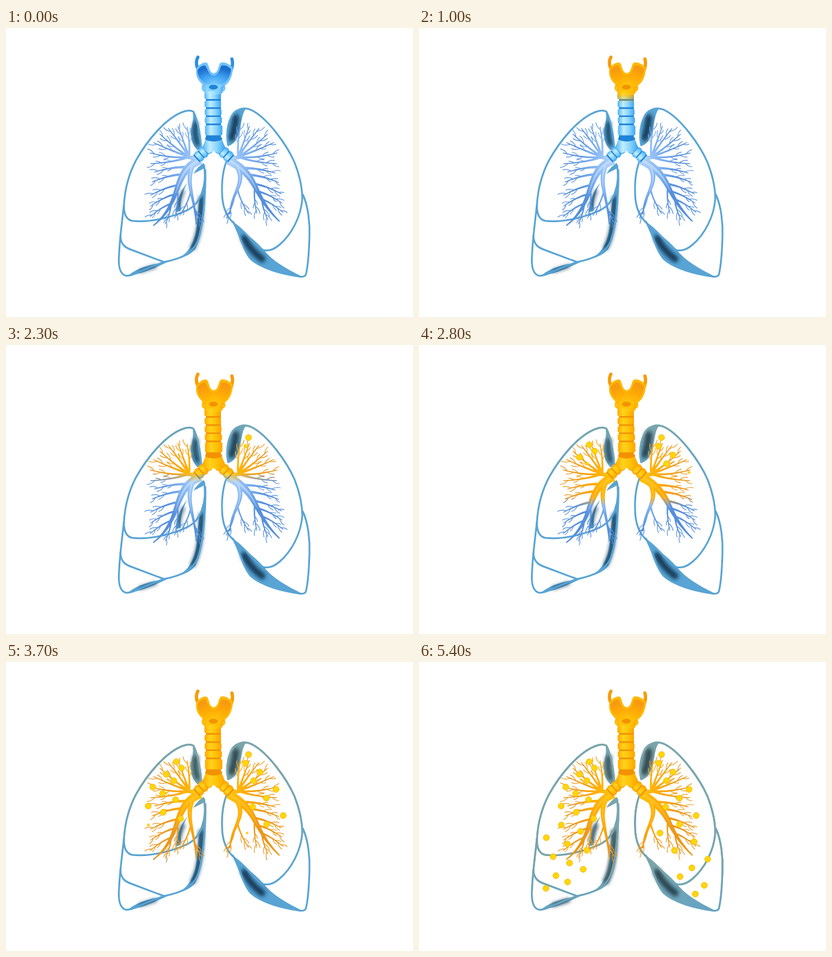
An HTML page for the animation above (5500 ms loop, 680 px wide and 484 px high).

```html
<!DOCTYPE html>
<html lang="en">
<head>
<meta charset="utf-8">
<title>Airflow through the lungs</title>
<style>
  @property --edge { syntax: '<number>'; inherits: true; initial-value: 38; }
  @keyframes flow { from { --edge: 38; } to { --edge: 478; } }
  html, body { margin: 0; width: 100%; height: 100%; overflow: hidden; background: #fff; }
  svg { display: block; width: 680px; height: 484px; animation: flow 5.5s steps(55) infinite; }
  .wipe { transform: translateY(calc(var(--edge) * 1px)); }
  .dot { fill: #ffd60a; stroke: #f7b500; stroke-width: 1;
         transform-box: fill-box; transform-origin: center;
         transform: scale(clamp(0, (var(--edge) - var(--from)) / 20, 1)); }
</style>
</head>
<body>
<svg id="stage" viewBox="0 0 680 484" xmlns="http://www.w3.org/2000/svg"></svg>
<script>
const MID = 347;
const SIDES = [-1, 1];

const BLUE = {
  id: 'blue', tube: ['#4db5f7', '#c2edff', '#86d3ff', '#3ba5f0'], gap: '#1f84d8', rim: '#70c2fb',
  body: ['#7bcbff', '#42a5f2', '#1c6fce'], horn: '#2f8fdd',
  limb: ['#a9cffa', '#7fb0f0', '#558fdc'], shine: '#c9e2fd'
};
const GOLD = {
  id: 'gold', tube: ['#ffa800', '#ffd21c', '#ffc107', '#ffa200'], gap: '#f39200', rim: '#ffb800',
  body: ['#ffc30a', '#ffab05', '#f79a10'], horn: '#f99a05',
  limb: ['#ffbf08', '#ffa90a', '#ec981c'], shine: '#ffc72e'
};

const rad = deg => deg * Math.PI / 180;
const fix = n => n.toFixed(1);
const hash = n => Math.abs(Math.sin(n * 12.9898) * 43758.5453) % 1;
const stops = list => list.map((c, i) =>
  `<stop offset="${i / (list.length - 1)}" stop-color="${c}"/>`).join('');

// Points along a cubic curve given by four points
const curve = (...p) => Array.from({ length: 25 }, (_, i) => {
  const t = i / 24, u = 1 - t;
  return [0, 1].map(k => u * u * u * p[0][k] + 3 * u * u * t * p[1][k] + 3 * u * t * t * p[2][k] + t * t * t * p[3][k]);
});

// A limb that leaves (x, y) below the horizontal by `deg`, away from the midline
function sprout([x, y], side, deg, len, bend = 12) {
  const at = (r, d) => [x + side * Math.cos(rad(d)) * r, y + Math.sin(rad(d)) * r];
  return curve([x, y], at(len * .35, deg + bend), at(len * .7, deg + bend * .3), at(len, deg));
}

const along = (q, f) => q[Math.round(f * (q.length - 1))];
const heading = (q, i) => {
  const a = q[Math.max(0, i - 1)], b = q[Math.min(q.length - 1, i + 1)];
  return Math.atan2(b[1] - a[1], b[0] - a[0]);
};

function taper(q, w0, w1) {
  const edge = sign => q.map(([x, y], i) => {
    const h = heading(q, i), w = sign * (w1 + (w0 - w1) * (1 - i / (q.length - 1))) / 2;
    return fix(x - Math.sin(h) * w) + ' ' + fix(y + Math.cos(h) * w);
  });
  return 'M' + [...edge(1), ...edge(-1).reverse()].join('L') + 'Z';
}

function limbs(side) {
  const main = side < 0
    ? curve([325, 221], [275, 241], [298, 290], [246, 331])
    : curve([371, 221], [425, 249], [408, 276], [457, 324]);
  const inner = side < 0
    ? curve([312, 229], [299, 260], [315, 280], [318, 329])
    : curve([386, 231], [402, 262], [376, 275], [374, 312]);
  const hub = [MID + side * 41, 216];
  const list = [
    { q: main, w: 15, end: 2 }, { q: inner, w: 9, end: 2 },
    { q: sprout([MID + side * 28, 218], side, -5, 20, 0), w: 8, end: 4.5 }
  ];
  const add = (q, w = 4) => list.push({ q, w, end: 1.2 });
  for (let i = 0; i < 7; i++) {
    const up = 16 * i - 10;
    add(sprout(hub, side, -up, 50 + 16 * Math.cos(rad(up)), 9 - 3 * i + 6 * (i % 2)));
  }
  for (let i = 0; i < 5; i++) {
    add(sprout(along(main, .16 + .14 * i), side, 8 + 6 * i, 58 - 4 * i, -12), 5 - .5 * i);
  }
  for (let i = 0; i < 2; i++) {
    add(sprout(along(main, .52 + .18 * i), side, 86 - 12 * i, 46 - 10 * i), 3);
    add(sprout(along(inner, .5 + .15 * i), i ? -side : side, 66 + 4 * i, 46 - 6 * i), 3);
  }
  return list;
}

function twigs(q, seed) {
  return [.44, .58, .72, .86].map((f, j) => {
    const i = Math.round(f * (q.length - 1)), [x, y] = q[i];
    const turn = (j + seed) % 2 ? 1 : -1, h = heading(q, i) + turn * .75;
    const len = 9 + 6 * hash(seed + j * 31);
    const at = (a, r) => fix(x + Math.cos(a) * r) + ' ' + fix(y + Math.sin(a) * r);
    return `M${fix(x)} ${fix(y)}Q${at(h, len * .6)} ${at(h - turn * .35, len)}`;
  }).join('');
}

function tree(pal) {
  let fill = '', fine = '', shine = '';
  SIDES.flatMap(limbs).forEach(({ q, w, end }, n) => {
    fill += taper(q, w, end);
    if (w < 8) fine += twigs(q, n);
    else shine += taper(q.slice(0, q.length * .6), w * .35, .4);
  });
  return `<path d="${fine}" fill="none" stroke="url(#${pal.id}-limb)" stroke-width="1.2" stroke-linecap="round"/>
    <path d="${fill}" fill="url(#${pal.id}-limb)"/><path d="${shine}" fill="${pal.shine}" opacity=".65"/>`;
}

function tube(pal) {
  const skin = `url(#${pal.id}-tube)`;
  const ring = (x, y, w, h) =>
    `<rect x="${x - w / 2}" y="${y}" width="${w}" height="${h}" rx="2.5" fill="${skin}"/>`;
  const cuffs = side => `<g transform="translate(${MID + side * 9} 201) rotate(${-side * 48})">
    <rect x="-8" y="-4" width="16" height="31" fill="${pal.gap}"/>
    ${[0, 1, 2].map(i => ring(0, 9.5 * i - 2, 19, 7.5)).join('')}</g>`;
  const rings = [0, 1, 2, 3, 4].map(i => ring(345 + i / 2, 108 + 13.7 * i, 27 + i / 2, i < 4 ? 11 : 17));
  return `${SIDES.map(cuffs).join('')}
    <path d="M334 106H359V190H334Z" fill="${pal.gap}"/>${rings.join('')}
    <path d="M333 187Q347 193 361 187L366 200 357 210 347 206 338 210 328 201Z" fill="${skin}"/>
    <path d="M333 183Q347 190 361 183V187Q347 193 333 187Z" fill="${pal.gap}"/>`;
}

function larynx(pal) {
  return `<g fill="none" stroke="${pal.horn}" stroke-linecap="round">
      <path d="M320.500 49Q316 57 320 67M377.500 52Q380 61 376 71" stroke-width="5.500"/>
      <path d="M329 96Q326 104 333 106M364 96Q368 104 360 106" stroke="${pal.rim}" stroke-width="2.500"/></g>
    <path d="M328 92H366L361 110Q346 114 332 110Z" fill="url(#${pal.id}-tube)"/>
    <path d="M318 68C322 62 329 57 335 58C340 60 338 74 347 76C356 74 354 62 359 58C366 56 373 61 379 66C379 81 373 92 365 97Q347 104 330 96C321 89 316 80 318 68Z" fill="${pal.rim}"/>
    <path d="M320 71C324 64 330 62 333 63C337 68 338 79 347 80C356 79 357 68 360 63C366 61 372 65 376 69C375 80 370 89 363 93Q347 98 332 92C324 86 320 80 320 71Z" fill="url(#${pal.id}-body)"/>
    <path d="M334 96Q346 91 360 96L356 106H338Z" fill="${pal.tube[2]}"/>
    <ellipse cx="346.500" cy="99" rx="7.500" ry="4" fill="${pal.gap}"/>`;
}

function airways(pal) {
  return `<defs>
    <linearGradient id="${pal.id}-tube">${stops(pal.tube)}</linearGradient>
    <radialGradient id="${pal.id}-body" cy=".95" r=".8">${stops(pal.body)}</radialGradient>
    <radialGradient id="${pal.id}-limb" gradientUnits="userSpaceOnUse" cx="${MID}" cy="225" r="90" fx="${MID}">
      ${stops([pal.limb[0], ...pal.limb])}</radialGradient></defs>
    ${tree(pal)}${tube(pal)}${larynx(pal)}`;
}

function lungs(line, deep) {
  return `<g fill="${line}">
      <path d="M312 142C320 150 326 173 327 200L320 205C311 195 307 182 309 170C311 162 314 152 312 142Z"/>
      <path d="M333 255C334 300 329 345 316 370Q307 382 288 386C301 379 312 366 317 343C322 318 318 290 333 255Z"/>
      <path d="M203 416C215 404 238 396 270 392C252 400 230 411 203 416Z"/>
      <path d="M303 259C294 269 286 286 283 309L292 306C291 290 294 275 303 259Z"/>
      <path d="M331 226Q321 231 313 244Q322 240 331 235Z"/>
      <path d="M371 198C367 180 370 155 379 142Q388 133 401 135C393 145 393 163 389 177Q383 194 371 198Z"/>
      <path d="M380 327C393 340 414 352 430 371C445 390 468 403 494 416C462 413 425 402 407 386C395 372 391 346 380 327Z"/>
    </g>
    <g fill="none" stroke="${deep}" stroke-linecap="round" filter="url(#blur)">
      <path d="M317 160Q314 178 320 194M326 285Q327 340 312 368" stroke-width="7"/>
      <path d="M224 407L250 399M288 303Q290 285 296 273" stroke-width="4"/>
      <path d="M384 150Q382 170 377 184M398 352Q408 372 428 387" stroke-width="11"/>
    </g>
    <g fill="none" stroke="${line}" stroke-width="3" stroke-linecap="round" stroke-linejoin="round">
      <path d="M326 200C325 178 319 150 313 140Q306 136 294 141C266 152 236 188 217 222C203 249 198 276 197 298C197 312 201 321 211 323C244 327 285 314 305 304C325 293 336 266 331 230"/>
      <path d="M197 296C194 325 190 352 189 378C187 400 191 413 201 415C211 416 226 405 264 392C294 386 312 377 320 357C330 330 334 270 333 238"/>
      <path d="M191 348C192 363 199 368 211 372L264 392"/>
      <path d="M371 196C367 172 372 151 383 140Q397 130 413 139C438 153 469 195 482 225C491 248 495 268 495 286C493 316 477 346 457 363Q443 375 430 372C414 364 403 343 383 329C368 317 361 297 361 275Q360 246 368 224"/>
      <path d="M496 279C505 298 508 328 507 350C506 382 504 401 501 413Q498 418 489 416C462 412 426 403 409 387C395 371 392 347 379 324"/>
    </g>`;
}

// Dots spread evenly down each lung; the left lung fills a little later
function dots(side) {
  const count = side < 0 ? 21 : 17, top = side < 0 ? 167 : 155, step = side < 0 ? 10.6 : 14.6;
  return Array.from({ length: count }, (_, i) => {
    const y = top + i * step;
    const near = 50 + Math.max(0, y - 310) * .6;
    const far = 142 - 72 * Math.max(0, (290 - y) / 130) ** 1.3;
    const x = MID + side * (near + (far - near) * ((.5 + i * .618) % 1));
    return `<circle class="dot" cx="${fix(x)}" cy="${fix(y)}" r="5" style="--from:${fix(y + (side < 0 ? 52 : 40))}"/>`;
  }).join('');
}

const mask = (id, rect) => `<mask id="${id}" maskUnits="userSpaceOnUse" x="0" y="0" width="680" height="484">
  <rect class="wipe" width="680" ${rect}/></mask>`;
const fade = (id, from) => `<linearGradient id="${id}" x2="0" y2="1">
  <stop offset="${from}" stop-color="#fff"/><stop offset="1" stop-color="#fff" stop-opacity="0"/></linearGradient>`;

document.getElementById('stage').innerHTML = `
  <defs>${fade('sharp', .974)}${fade('soft', .783)}
    <filter id="blur"><feGaussianBlur stdDeviation="3"/></filter>
    ${mask('above', 'y="-600" height="608" fill="url(#sharp)"')}
    ${mask('below', 'y="-6" height="600" fill="#fff"')}
    ${mask('tint', 'y="-600" height="600" fill="url(#soft)"')}</defs>
  ${lungs('#58a4d4', '#143a58')}
  <g mask="url(#tint)">${lungs('#7ba5a9', '#33474f')}</g>
  <g mask="url(#below)">${airways(BLUE)}</g>
  <g mask="url(#above)">${airways(GOLD)}</g>
  ${SIDES.map(dots).join('')}`;
</script>
</body>
</html>
```
